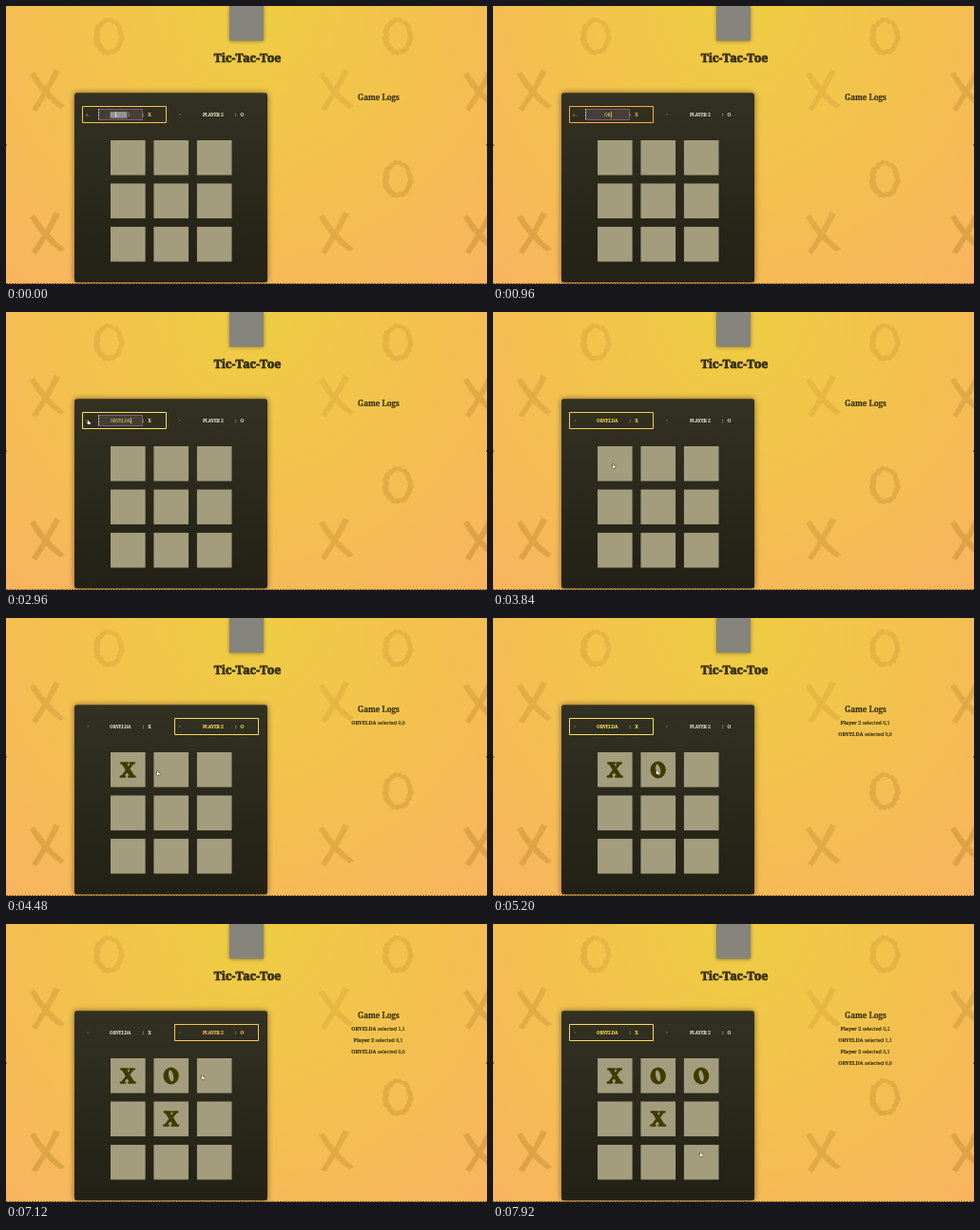
These frames come from a looping animation (506 by 292 pixels, 8 s). An HTML page with a canvas:

```html
<!DOCTYPE html>
<html lang="en">
<head>
<meta charset="utf-8">
<title>Tic-Tac-Toe</title>
<style>
html, body { margin: 0; width: 100%; height: 100%; overflow: hidden; background: #f3c050; }
canvas { display: block; width: 506px; height: 292px; }
</style>
</head>
<body>
<canvas id="stage"></canvas>
<script>
const W = 506, H = 292, LOOP = 8000;
const NAME = 'ORVELDA';
const SLAB = '"Noto Serif", serif';
const FAT = '"Liberation Serif", "Noto Serif", serif';
const INK = '#332e0c';
const MARK = '#3f3b00';
const SAVE_AT = 3150;
const CELL = 36.6, PITCH = 45.45;

const moves = [
  { t: 4000, row: 0, col: 0, who: 0 },
  { t: 5000, row: 0, col: 1, who: 1 },
  { t: 6150, row: 1, col: 1, who: 0 },
  { t: 7430, row: 0, col: 2, who: 1 }
];

// pointer stops: time, x, y
const path = [
  [2400, 113, 116], [2880, 87, 116], [3300, 87, 116], [3850, 127, 162],
  [4150, 128, 162], [4480, 160, 163], [4750, 172, 162], [5200, 173, 162],
  [5700, 173, 198], [6350, 173, 199], [6950, 205, 161], [7120, 207, 161],
  [7320, 217, 161], [7550, 218, 162], [7900, 219, 242], [8000, 219, 242]
];

const canvas = document.getElementById('stage');
const dpr = window.devicePixelRatio || 1;
canvas.width = W * dpr;
canvas.height = H * dpr;
const ctx = canvas.getContext('2d');
ctx.scale(dpr, dpr);

function text(str, x, y, font, color, align = 'center', weight = 0) {
  ctx.font = font;
  ctx.textAlign = align;
  ctx.fillStyle = color;
  ctx.fillText(str, x, y);
  if (weight) {
    ctx.strokeStyle = color;
    ctx.lineWidth = weight;
    ctx.lineJoin = 'round';
    ctx.strokeText(str, x, y);
  }
}

// closed loop with a rough, wavy edge
function roughLoop(x, y, rx, ry, wave) {
  for (let i = 0; i <= 90; i++) {
    const a = i / 90 * 2 * Math.PI;
    const k = wave * (Math.sin(a * 17) + Math.sin(a * 7 + 1));
    ctx.lineTo(x + (rx + k) * Math.cos(a), y + (ry + k) * Math.sin(a));
  }
  ctx.closePath();
}

function brushO(x, y) {
  ctx.beginPath();
  roughLoop(x, y, 16, 19.5, 0.5);
  ctx.moveTo(x + 10, y);
  roughLoop(x + 0.5, y - 0.5, 10, 14.5, 0.4);
  ctx.fill('evenodd');
}

function brushX(x, y) {
  ctx.beginPath();
  // shallow stroke, then the steep one
  ctx.moveTo(x - 18, y - 16);
  ctx.lineTo(x - 13, y - 19);
  ctx.quadraticCurveTo(x, y + 2, x + 19, y + 17);
  ctx.lineTo(x + 14, y + 20);
  ctx.quadraticCurveTo(x - 6, y + 6, x - 18, y - 16);
  ctx.closePath();
  ctx.moveTo(x + 8, y - 22);
  ctx.lineTo(x + 14, y - 19);
  ctx.quadraticCurveTo(x + 3, y + 2, x - 11, y + 23);
  ctx.lineTo(x - 16, y + 20);
  ctx.quadraticCurveTo(x - 2, y, x + 8, y - 22);
  ctx.closePath();
  ctx.fill();
}

function glowFrom(stops) {
  const g = ctx.createRadialGradient(253, 0, 0, 253, 0, 386);
  stops.forEach((c, i) => g.addColorStop(i / (stops.length - 1), c));
  return g;
}

function background() {
  ctx.fillStyle = glowFrom(['#eecd42', '#f3c14e', '#f8b45f']);
  ctx.fillRect(0, 0, W, H);

  ctx.fillStyle = glowFrom(['rgba(170, 118, 30, 0.08)', 'rgba(170, 118, 30, 0.36)']);
  for (const y of [0, 150]) {
    for (const x of [108, 412]) brushO(x, y + 32);
    for (const x of [43, 347, 499]) brushX(x, y + 88);
  }
}

function header() {
  ctx.save();
  ctx.shadowColor = 'rgba(60, 45, 0, 0.5)';
  ctx.shadowBlur = 4 * dpr;
  ctx.fillStyle = '#85847d';
  ctx.fillRect(235, 0, 36, 36.5);
  ctx.restore();
  text('Tic-Tac-Toe', 254, 58.8, '900 12.4px ' + SLAB, INK, 'center', 0.7);
  text('Game Logs', 392, 99.2, 'bold 8px ' + SLAB, INK, 'center', 0.15);
}

function panel() {
  const g = ctx.createLinearGradient(0, 91, 0, 290);
  g.addColorStop(0, '#333122');
  g.addColorStop(1, '#232115');
  ctx.save();
  ctx.shadowColor = 'rgba(0, 0, 0, 0.5)';
  ctx.shadowBlur = 6 * dpr;
  ctx.fillStyle = g;
  ctx.beginPath();
  ctx.roundRect(72, 91.2, 203, 199, 2.5);
  ctx.fill();
  ctx.restore();
}

// highlight colour swings between yellow and orange
function pulse(ms) {
  const k = (1 - Math.cos(Math.PI * ms / 2000)) / 2;
  const mix = (a, b) => Math.round(a + (b - a) * k);
  return `rgb(${mix(246, 252)},${mix(227, 170)},${mix(90, 66)})`;
}

function nameInput(t) {
  const font = '500 4.5px ' + SLAB;
  ctx.fillStyle = '#463f35';
  ctx.fillRect(97, 108, 47, 12);
  ctx.save();
  ctx.lineWidth = 1;
  ctx.strokeStyle = '#7d5a7c';
  ctx.strokeRect(97.5, 108.5, 46, 11);
  ctx.strokeStyle = '#cdb6cd';
  ctx.setLineDash([2, 1]);
  ctx.beginPath();
  ctx.moveTo(97.5, 108);
  ctx.lineTo(97.5, 120);
  ctx.stroke();
  ctx.restore();

  if (t < 700) {
    const all = t >= 200;
    ctx.fillStyle = '#85868c';
    ctx.fillRect(109.5, 111, all ? 22 : 18, 7);
    text('PLAYER 1', 120.3, 115.8, font, '#b9b7a8');
    ctx.strokeStyle = '#f4f4f4';
    ctx.lineWidth = 0.8;
    ctx.beginPath();
    ctx.moveTo(115.5, 111.5);
    ctx.lineTo(115.5, 117);
    ctx.stroke();
    return;
  }
  const count = Math.min(NAME.length, 1 + Math.floor((t - 700) / 160));
  const str = NAME.slice(0, count);
  text(str, 120.3, 115.8, font, '#d3bd68', 'center', 0.1);
  const end = 120.8 + ctx.measureText(str).width / 2;
  if (t < 1900 || t % 1000 < 520 || t > 2900) {
    ctx.fillStyle = '#e8e2c0';
    ctx.fillRect(end, 111, 0.7, 6.5);
  }
}

function player(i, t, active, since) {
  const dx = i * 97.5;
  const glow = active ? pulse(t - since) : '#e1dec7';
  const editing = i === 0 && t < SAVE_AT;
  if (active) {
    ctx.strokeStyle = glow;
    ctx.lineWidth = 1;
    ctx.strokeRect(80.5 + i * 97, 105.5, 88, 17);
  }
  if (editing) {
    text('S...', 84, 115.5, '4px ' + SLAB, '#c3ba78', 'left');
    nameInput(t);
  } else {
    text('=', 86.3 + i * 96.5, 115.3, 'bold 4px ' + SLAB, '#c3ba78');
    text(i ? 'PLAYER 2' : NAME, 120.3 + dx, 115.9, 'bold 4.5px ' + SLAB, glow, 'center', 0.15);
  }
  text(':', 144.3 + dx, 115.9, 'bold 4.8px ' + SLAB, glow, 'center', 0.15);
  text(i ? 'O' : 'X', 151 + dx, 115.9, 'bold 4.8px ' + SLAB, glow, 'center', 0.15);
}

// heavy round letter with a leaning counter
function markO(x, y) {
  ctx.fillStyle = MARK;
  ctx.beginPath();
  ctx.ellipse(x, y, 8.2, 8.9, 0, 0, 2 * Math.PI);
  ctx.moveTo(x + 2.5, y);
  ctx.ellipse(x, y, 2.4, 6, -0.22, 0, 2 * Math.PI);
  ctx.fill('evenodd');
}

function board(done) {
  ctx.fillStyle = '#a39d7d';
  for (let r = 0; r < 3; r++) {
    for (let c = 0; c < 3; c++) {
      ctx.fillRect(110 + c * PITCH, 141 + r * PITCH, CELL, CELL);
    }
  }
  for (const m of done) {
    const x = 128.2 + m.col * PITCH, y = 159.5 + m.row * PITCH;
    if (m.who) markO(x, y);
    else text('X', x, y + 7.5, 'bold 22.5px ' + FAT, MARK, 'center', 1.6);
  }
}

function logs(done) {
  const bold = 'bold 5.3px ' + SLAB, plain = '5.3px ' + SLAB;
  done.slice().reverse().forEach((m, i) => {
    const who = m.who ? 'Player 2' : NAME;
    const rest = ` selected ${m.row},${m.col}`;
    ctx.font = bold;
    const a = ctx.measureText(who).width;
    ctx.font = plain;
    const x = 391.5 - (a + ctx.measureText(rest).width) / 2;
    const y = 112.2 + i * 12;
    text(who, x, y, bold, INK, 'left', 0.15);
    text(rest, x + a, y, plain, INK, 'left', 0.15);
  });
}

function pointer(t) {
  if (t < path[0][0]) return;
  const n = Math.max(1, path.findIndex(p => p[0] > t));
  const [t0, x0, y0] = path[n - 1], [t1, x1, y1] = path[n];
  const k = (t - t0) / (t1 - t0);
  const e = k * k * (3 - 2 * k);
  ctx.save();
  ctx.translate(x0 + (x1 - x0) * e, y0 + (y1 - y0) * e);
  ctx.beginPath();
  ctx.moveTo(-1, -2);
  ctx.lineTo(0, -2);
  ctx.lineTo(0.3, -0.6);
  ctx.lineTo(1.9, 0);
  ctx.lineTo(1.5, 1.9);
  ctx.lineTo(-0.8, 1.9);
  ctx.lineTo(-2, 0.2);
  ctx.lineTo(-1, 0.2);
  ctx.closePath();
  ctx.strokeStyle = '#1d1b12';
  ctx.lineWidth = 1;
  ctx.stroke();
  ctx.fillStyle = '#fff';
  ctx.fill();
  ctx.restore();
}

function edges() {
  ctx.save();
  ctx.strokeStyle = 'rgba(60, 48, 24, 0.6)';
  ctx.lineWidth = 1;
  ctx.setLineDash([2, 1]);
  ctx.beginPath();
  ctx.moveTo(0, 291.5);
  ctx.lineTo(W, 291.5);
  ctx.stroke();
  ctx.restore();
  ctx.fillStyle = '#8a6d3a';
  ctx.fillRect(0, 145, 1, 2);
  ctx.fillRect(505, 145, 1, 2);
}

function draw(t) {
  const done = moves.filter(m => m.t <= t);
  const turn = done.length % 2;
  const since = done.length ? done[done.length - 1].t : -1000;
  background();
  header();
  panel();
  player(0, t, turn === 0, since);
  player(1, t, turn === 1, since);
  board(done);
  logs(done);
  pointer(t);
  edges();
}

const start = performance.now();
function tick() {
  draw((performance.now() - start) % LOOP);
  requestAnimationFrame(tick);
}
tick();
</script>
</body>
</html>
```
